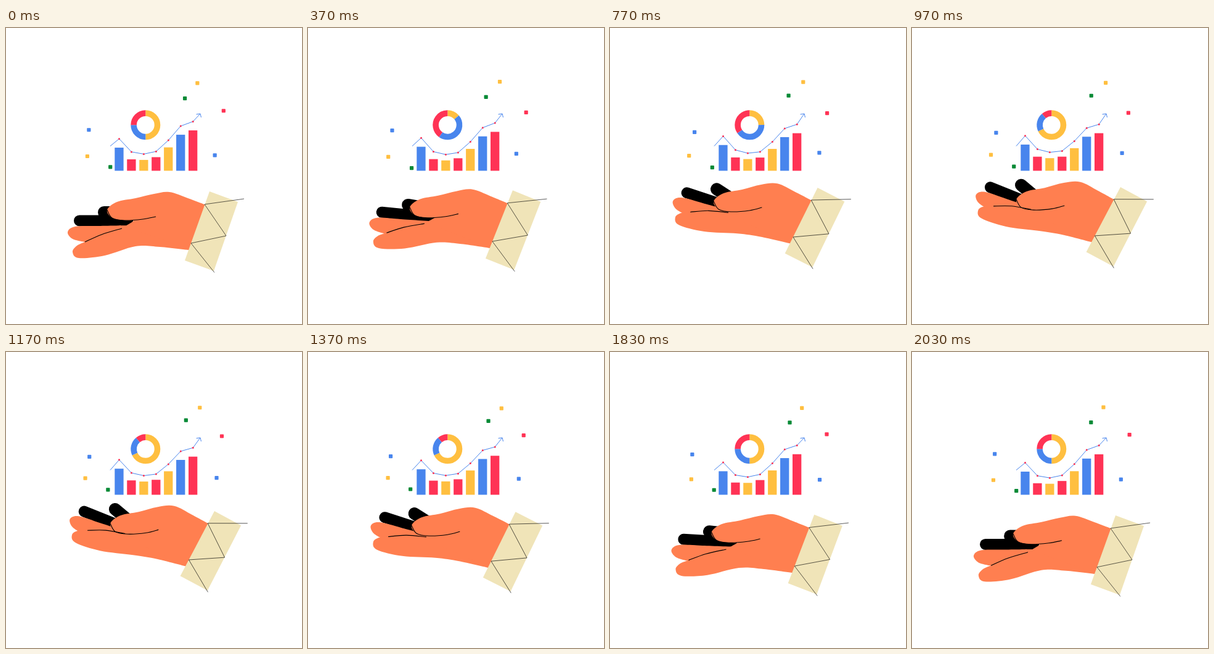
An HTML page with a canvas for the animation above (2070 ms loop, 480 by 480 pixels).

```html
<!DOCTYPE html>
<html>
<head>
<meta charset="utf-8">
<style>
  html, body { margin: 0; width: 100%; height: 100%; overflow: hidden; background: #fff; }
  canvas { display: block; width: 480px; height: 480px; }
</style>
</head>
<body>
<canvas id="stage" width="480" height="480"></canvas>
<script>
const ctx = document.getElementById('stage').getContext('2d');
const LOOP = 2070;
const BLUE = '#4885ed', RED = '#ff3355', YELLOW = '#ffbf40', GREEN = '#088a36';
const SKIN = '#ff7f50', CUFF = '#f0e4b8', BLACK = '#000';

const rad = deg => deg * Math.PI / 180;
const wave = (theta, phase) => Math.cos(theta - rad(phase));
const mix = (a, b, k) => a + (b - a) * k;
const clamp = v => Math.max(0, Math.min(1, v));

function polyline(pts) {
  ctx.beginPath();
  pts.forEach(q => ctx.lineTo(...q));
}

// Smooth curve through the points; listed corners stay sharp.
function spline(pts, closed, corners = []) {
  const n = pts.length;
  const at = i => closed ? pts[(i + n) % n] : pts[Math.max(0, Math.min(n - 1, i))];
  const handle = (i, dir) => {
    const q = at(i), k = corners.includes((i + n) % n) ? 0 : dir / 6;
    return [0, 1].map(j => q[j] + (at(i + 1)[j] - at(i - 1)[j]) * k);
  };
  ctx.beginPath();
  ctx.moveTo(...pts[0]);
  for (let i = 0; i < (closed ? n : n - 1); i++) {
    ctx.bezierCurveTo(...handle(i, 1), ...handle(i + 1, -1), ...at(i + 1));
  }
}

function fill(color) {
  ctx.fillStyle = color;
  ctx.fill();
}

function stroke(color, width, cap = 'butt') {
  ctx.strokeStyle = color;
  ctx.lineWidth = width;
  ctx.lineCap = cap;
  ctx.stroke();
}

// Turns points about a joint, easing in over the stretch around it.
const bend = (jx, jy, angle) => pts => pts.map(([x, y]) => {
  const a = angle * clamp((jx + 10 - x) / 50), c = Math.cos(a), s = Math.sin(a);
  return [jx + c * (x - jx) - s * (y - jy), jy + s * (x - jx) + c * (y - jy)];
});

// The arm swings about one pivot; fingers add their own turn.
function drawHand(theta) {
  const lift = (1 - wave(theta, 5)) / 2, swing = 0.145 * lift;
  const bendThumb = bend(262, 290, -swing);
  const bendUpper = bend(205, 320, 0.2 * lift);
  const bendLower = bend(210, 345, 0.28 * lift);

  ctx.save();
  ctx.translate(383, 318);
  ctx.rotate(swing);
  ctx.translate(-383, -318);

  polyline(bend(195, 315, 0.52 * lift)([[159, 299], [190, 299]]));
  stroke(BLACK, 20, 'round');
  polyline(bend(200, 313, 0.22 * lift)([[119, 312.5], [170, 312.5], [197, 312.5]]));
  stroke(BLACK, 18, 'round');

  spline(bendUpper([[205, 320], [150, 321], [112, 322], [100, 331], [108, 342],
    [128, 347], [210, 330]]), true, [0, 5, 6]);
  fill(SKIN);
  spline(bendLower([[304, 361], [250, 355], [210, 354], [160, 369], [118, 373], [108, 363],
    [115, 353], [128, 347], [188, 325], [215, 308], [327, 288]]), true, [0, 7, 8, 9, 10]);
  fill(SKIN);

  const thumb = bendThumb([[327, 288], [295, 276], [265, 266], [240, 269], [210, 276],
    [180, 282], [164, 295], [172, 308], [192, 312], [206, 312], [215, 330], [304, 361]]);
  spline(thumb, true, [0, 9, 10, 11]);
  fill(SKIN);
  spline([...thumb.slice(6, 9), ...bendThumb([[222, 310], [243, 306]])]);
  stroke(BLACK, 1.1);
  spline(bendLower([[128, 347], [155, 335], [188, 325]]));
  stroke(BLACK, 1.1);

  polyline([[330, 265], [376, 282], [337, 394], [290, 377]]);
  fill(CUFF);
  polyline([[386, 277], [322, 286], [357, 337], [300, 349], [338, 396.5]]);
  stroke('rgba(0,0,0,0.7)', 0.9);
  ctx.restore();
}

// Ends of the yellow and blue parts, clockwise from the top, in three steps.
function drawRing(t) {
  const states = [[180, 270], [50, 215], [245, 320]];
  const third = LOOP / 3, k = Math.floor(t / third);
  const s = clamp((t - k * third) / 280), ease = s * s * (3 - 2 * s);
  const [a, b] = states[k].map((v, i) => mix(v, states[(k + 1) % 3][i], ease));
  [[0, a, YELLOW], [a, b, BLUE], [b, 360, RED]].forEach(([from, to, color]) => {
    ctx.beginPath();
    ctx.arc(226.3, 157.3, 19.2, rad(from - 90), rad(to - 90));
    stroke(color, 9.6);
  });
}

function drawChart(theta) {
  const levels = [191.5, 210.7, 212.3, 208.8, 194, 174.5, 168.2];
  const colors = [BLUE, RED, YELLOW, RED, YELLOW, BLUE, RED];
  const nodes = levels.map((level, i) => {
    const x = 176.3 + 19.95 * i, y = level + 2.5 * wave(theta, 25 * i);
    ctx.fillStyle = colors[i];
    ctx.fillRect(x, y, 14.3, 231.5 - y);
    return [x + 7.2, y - 11.8 - 2.8 * Math.cos(rad(60 * (i - 5.6)))];
  });
  polyline([[169, 191.5], ...nodes, [315, 139]]);
  stroke(BLUE, 1);
  polyline([[308.5, 140], [315, 139], [316.5, 145]]);
  stroke(BLUE, 1);
  for (const [x, y] of nodes) {
    ctx.beginPath();
    ctx.arc(x, y, 1.5, 0, 7);
    fill(RED);
  }
}

// Each speck circles its centre, starting from its own phase.
function drawSpecks(theta) {
  const specks = [
    [YELLOW, 312.3, 89.3, 195], [GREEN, 290.6, 112, 255], [RED, 351.7, 135.8, 55],
    [BLUE, 135.2, 167.6, 115], [YELLOW, 130, 206.6, 340], [GREEN, 167.2, 224.8, 0],
    [BLUE, 339.8, 204.8, 235]
  ];
  for (const [color, x, y, phase] of specks) {
    ctx.beginPath();
    ctx.roundRect(x + 2 * wave(theta, phase) - 3.1, y + 2.4 * wave(theta, phase + 75) - 3.1, 6.2, 6.2, 1);
    fill(color);
  }
}

function draw(now) {
  const t = now % LOOP, theta = t / LOOP * 2 * Math.PI;
  ctx.fillStyle = '#fff';
  ctx.fillRect(0, 0, 480, 480);
  drawHand(theta);
  drawRing(t);
  drawChart(theta);
  drawSpecks(theta);
}

const start = performance.now();
function tick() {
  draw(performance.now() - start);
  requestAnimationFrame(tick);
}
tick();
</script>
</body>
</html>
```
